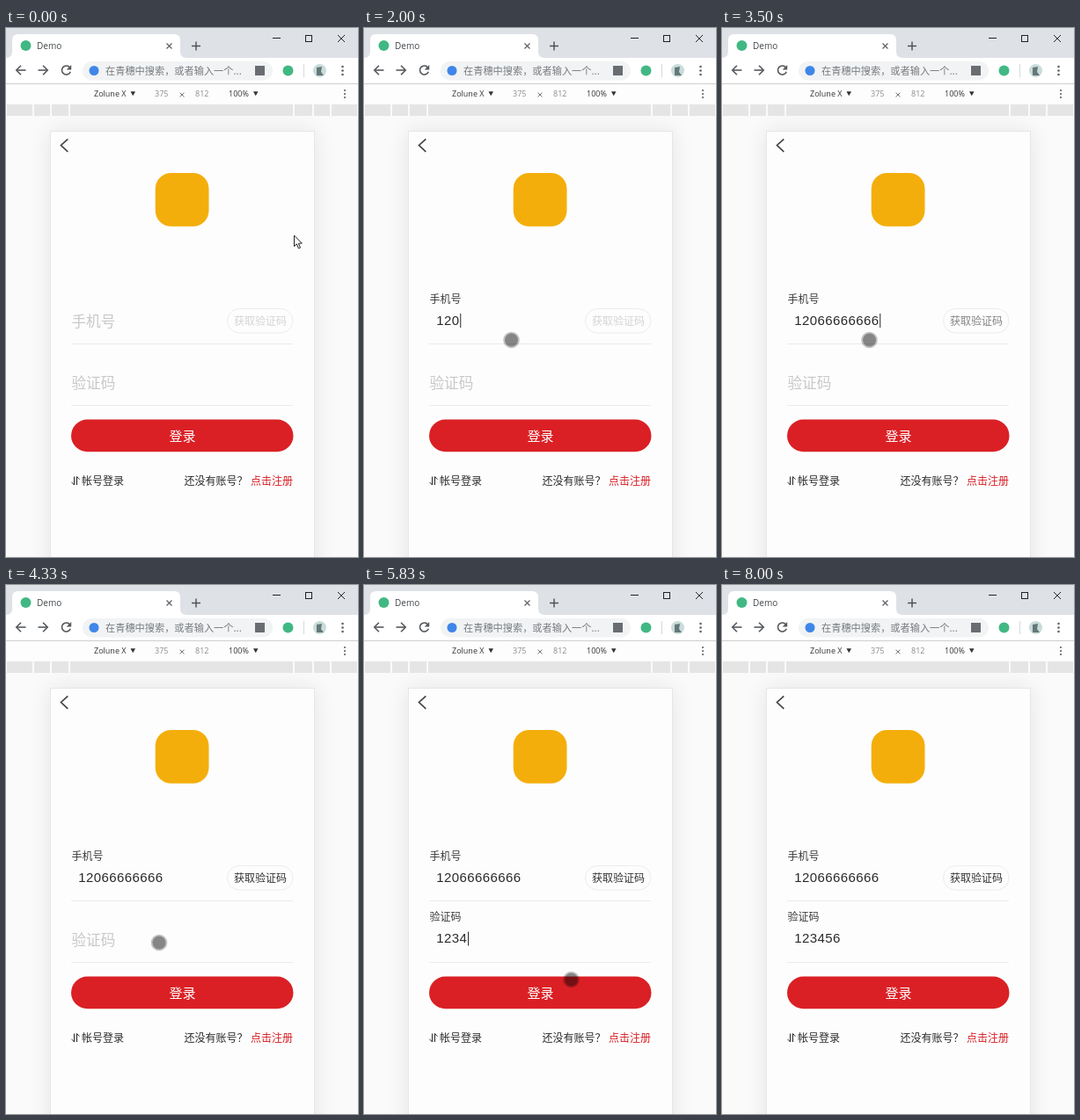
Animation of 400x602 px, one loop 8670 ms. Source, as an HTML page with a canvas:

```html
<!DOCTYPE html>
<html lang="zh-CN">
<head>
<meta charset="utf-8">
<title>Demo</title>
<style>
html, body { margin: 0; width: 100%; height: 100%; overflow: hidden; background: #fafafa; }
canvas { display: block; width: 400px; height: 602px; }
</style>
</head>
<body>
<canvas id="stage"></canvas>
<script>
const W = 400, H = 602, LOOP = 8670, FPS = 6;
const CJK = '"Noto Sans CJK SC", "Noto Sans CJK", sans-serif';
const LATIN = '"Open Sans", sans-serif';
const DIGITS = '"Liberation Sans", Arial, sans-serif';
const INK = '#2a2a2a', RED = '#d71c22';
const PHONE = '12066666666', CODE = '123456';
const CODE_STEPS = [32, 33, 34, 35, 36, 38];
// Touch pointer: step, x, y
const TOUCH = [[1, 322, 243], [2, 322, 243], [5, 167.5, 355], [23, 167.5, 355],
  [26, 174, 407], [30, 174, 407], [35, 235.5, 449], [40, 235.5, 449], [45, 268.5, 270.5], [47, 268.5, 270.5]];

const canvas = document.getElementById('stage');
const ctx = canvas.getContext('2d');
const dpr = window.devicePixelRatio || 1;
canvas.width = W * dpr;
canvas.height = H * dpr;

const clamp = v => Math.max(0, Math.min(1, v));
const mix = (a, b, p) => a + (b - a) * p;
const gray = v => `rgb(${v},${v},${v})`;

function rect(x, y, w, h, color) {
  ctx.fillStyle = color;
  ctx.fillRect(x, y, w, h);
}

function pill(x, y, w, h, r, fill, stroke) {
  ctx.beginPath();
  ctx.roundRect(x, y, w, h, r);
  if (fill) { ctx.fillStyle = fill; ctx.fill(); }
  if (stroke) { ctx.strokeStyle = stroke; ctx.lineWidth = 1; ctx.stroke(); }
}

function disc(x, y, r, color) {
  ctx.beginPath();
  ctx.arc(x, y, r, 0, Math.PI * 2);
  ctx.fillStyle = color;
  ctx.fill();
}

function poly(points, color, width) {
  ctx.beginPath();
  points.forEach(([x, y]) => ctx.lineTo(x, y));
  if (width) { ctx.strokeStyle = color; ctx.lineWidth = width; ctx.stroke(); }
  else { ctx.fillStyle = color; ctx.fill(); }
}

function cross(x, y, r, color, width) {
  poly([[x - r, y - r], [x + r, y + r]], color, width);
  poly([[x - r, y + r], [x + r, y - r]], color, width);
}

// Text with its optical middle at y
function text(str, x, y, size, color, family = CJK, align = 'left') {
  ctx.font = `${size}px ${family}`;
  ctx.textAlign = align;
  ctx.fillStyle = color;
  ctx.fillText(str, x, y + size * (family === CJK ? 0.38 : 0.36));
}

function dots(x, y, gap, r) {
  for (let i = -1; i <= 1; i++) disc(x, y + i * gap, r, '#5f6368');
}

function arrow(x, dir) {
  poly([[x - 5.5 * dir, 48], [x + 5 * dir, 48]], '#55585c', 1.6);
  poly([[x, 42.8], [x + 5.2 * dir, 48], [x, 53.2]], '#55585c', 1.6);
}

function drawTabs() {
  rect(0, 0, W, 34, '#dee1e6');
  ctx.beginPath();
  ctx.moveTo(0, 34);
  ctx.quadraticCurveTo(7, 34, 7, 27);
  ctx.lineTo(7, 14);
  ctx.quadraticCurveTo(7, 7, 14, 7);
  ctx.lineTo(191, 7);
  ctx.quadraticCurveTo(198, 7, 198, 14);
  ctx.lineTo(198, 27);
  ctx.quadraticCurveTo(198, 34, 205, 34);
  ctx.fillStyle = '#fff';
  ctx.fill();
  disc(22.5, 20, 6, '#41b883');
  text('Demo', 35, 20.5, 10, '#45494d', LATIN);
  cross(185.5, 20.5, 3, '#5f6368', 1.3);
  poly([[211, 20.5], [221, 20.5]], '#4a4d51', 1.4);
  poly([[216, 15.5], [216, 25.5]], '#4a4d51', 1.4);
  poly([[303, 11.5], [312, 11.5]], '#222', 1);
  ctx.strokeRect(340.5, 8.5, 7, 7);
  cross(381, 12, 4, '#222', 1);
}

function drawToolbar() {
  rect(0, 34, W, 29, '#fff');
  arrow(17, -1);
  arrow(42, 1);
  ctx.beginPath();
  ctx.arc(68.5, 48, 5, 0.35, Math.PI * 1.75);
  ctx.strokeStyle = '#55585c';
  ctx.lineWidth = 1.6;
  ctx.stroke();
  poly([[74.2, 42], [74.2, 47.5], [68.7, 47.5]], '#55585c');
  pill(87, 38, 216, 21.5, 10.75, '#f1f3f4');
  disc(100, 48.5, 5.5, '#3f86e8');
  text('在青穗中搜索\uff0c或者输入一个...', 113, 48.5, 11.2, '#777a7e');
  rect(283, 43, 11, 11, '#696d72');
  disc(320.5, 48.5, 6, '#41b883');
  rect(338, 41, 1, 15, '#d5d8dc');
  disc(356.5, 48.5, 7.5, '#c8dcda');
  poly([[353, 45], [359, 44], [358, 50], [361, 54], [353, 54]], '#66777a');
  dots(382.5, 48.5, 4.5, 1.3);
}

function drawDeviceBar() {
  rect(0, 63, W, 1, '#cfcfcf');
  rect(0, 64, W, 22, '#fdfdfd');
  const label = (str, x, color = '#333') => text(str, x, 75, 9, color, LATIN);
  const caret = x => poly([[x, 72.3], [x + 5.5, 72.3], [x + 2.75, 77.3]], '#333');
  label('Zolune X', 100);
  caret(141.5);
  label('375', 169, '#8a8a8a');
  cross(200, 76, 2.4, '#777', 1);
  label('812', 215, '#8a8a8a');
  label('100%', 253);
  caret(281);
  dots(385, 75, 4, 1.1);
  const edges = [0, 31, 51, 72, 327, 349, 369, 400];
  for (let i = 0; i < 7; i++) {
    rect(edges[i] + 1, 87, edges[i + 1] - edges[i] - 2, 13, '#e5e5e5');
  }
}

function drawPage() {
  ctx.save();
  ctx.shadowColor = 'rgba(0,0,0,.09)';
  ctx.shadowBlur = 24 * dpr;
  rect(50, 117, 301, 520, '#fdfdfd');
  ctx.restore();
  ctx.strokeStyle = '#e6e6e6';
  ctx.lineWidth = 1;
  ctx.strokeRect(50.5, 117.5, 300, 520);
  poly([[70.3, 126.3], [62.5, 133.5], [70.3, 140.8]], '#444', 1.7);
  pill(169.7, 165, 60.8, 60.8, 18, '#f4ae0b');
  rect(74, 359, 252, 1, '#ebebeb');
  rect(74, 429, 252, 1, '#ebebeb');
  pill(74, 445.6, 252.5, 36.6, 18.3, '#da2025');
  text('登录', 200.5, 464, 15, '#fff', CJK, 'center');
  poly([[77.5, 510.5], [77.5, 520], [74.5, 516.8]], INK, 1);
  poly([[80.5, 520], [80.5, 510.5], [83.5, 513.7]], INK, 1);
  text('帐号登录', 86, 515, 12, INK);
  text('还没有账号\uff1f', 202.5, 515, 12, INK);
  text('点击注册', 278, 515, 12, RED);
}

function drawField(name, y, lift, value, focused) {
  text(name, 74.5, mix(y, y - 26, lift), mix(16.6, 12, lift), gray(Math.round(mix(200, 60, lift))));
  ctx.letterSpacing = '0.41px';
  text(value, 82.3, y - 1.7, 15, INK, DIGITS);
  ctx.letterSpacing = '0px';
  if (focused) rect(83 + value.length * 8.75, y - 9, 1, 16, INK);
}

function drawForm(step) {
  const typed = Math.max(0, Math.min(PHONE.length, step - 9));
  drawField('手机号', 334, clamp((step - 6) / 3), PHONE.slice(0, typed), step >= 7 && step < 25);
  pill(251.5, 319.5, 74.5, 27.5, 13.75, null, '#ececec');
  const ready = clamp((step - 20) / 2);
  text('获取验证码', 259, 333.5, 12, gray(Math.round(mix(212, 50, ready))));
  const count = CODE_STEPS.filter(s => step >= s).length;
  drawField('验证码', 403.5, clamp((step - 26) / 3), CODE.slice(0, count), step >= 27 && step < 45);
}

function drawPointer(step) {
  if (step < 1) {
    const shape = [[0, 0], [0, 12.5], [2.9, 9.8], [5, 14.8], [7, 14], [4.9, 9.2], [8.8, 9], [0, 0]]
      .map(([x, y]) => [x + 327.5, y + 236]);
    poly(shape, '#fff');
    poly(shape, '#222', 1);
    return;
  }
  const i = TOUCH.findIndex(k => k[0] >= step);
  if (i < 0) return;
  const b = TOUCH[i], a = TOUCH[Math.max(0, i - 1)];
  const p = b === a ? 1 : (step - a[0]) / (b[0] - a[0]);
  const x = mix(a[1], b[1], p), y = mix(a[2], b[2], p);
  disc(x, y, 9.3, 'rgba(0,0,0,.23)');
  disc(x, y, 7.5, 'rgba(0,0,0,.31)');
}

function draw(time) {
  const step = Math.floor((time % LOOP + 5) * FPS / 1000);
  ctx.setTransform(dpr, 0, 0, dpr, 0, 0);
  rect(0, 0, W, H, '#fafafa');
  drawPage();
  drawTabs();
  drawToolbar();
  drawDeviceBar();
  drawForm(step);
  drawPointer(step);
}

let start;
function tick(now) {
  start ??= now;
  draw(now - start);
  requestAnimationFrame(tick);
}
draw(0);
requestAnimationFrame(tick);
</script>
</body>
</html>
```
